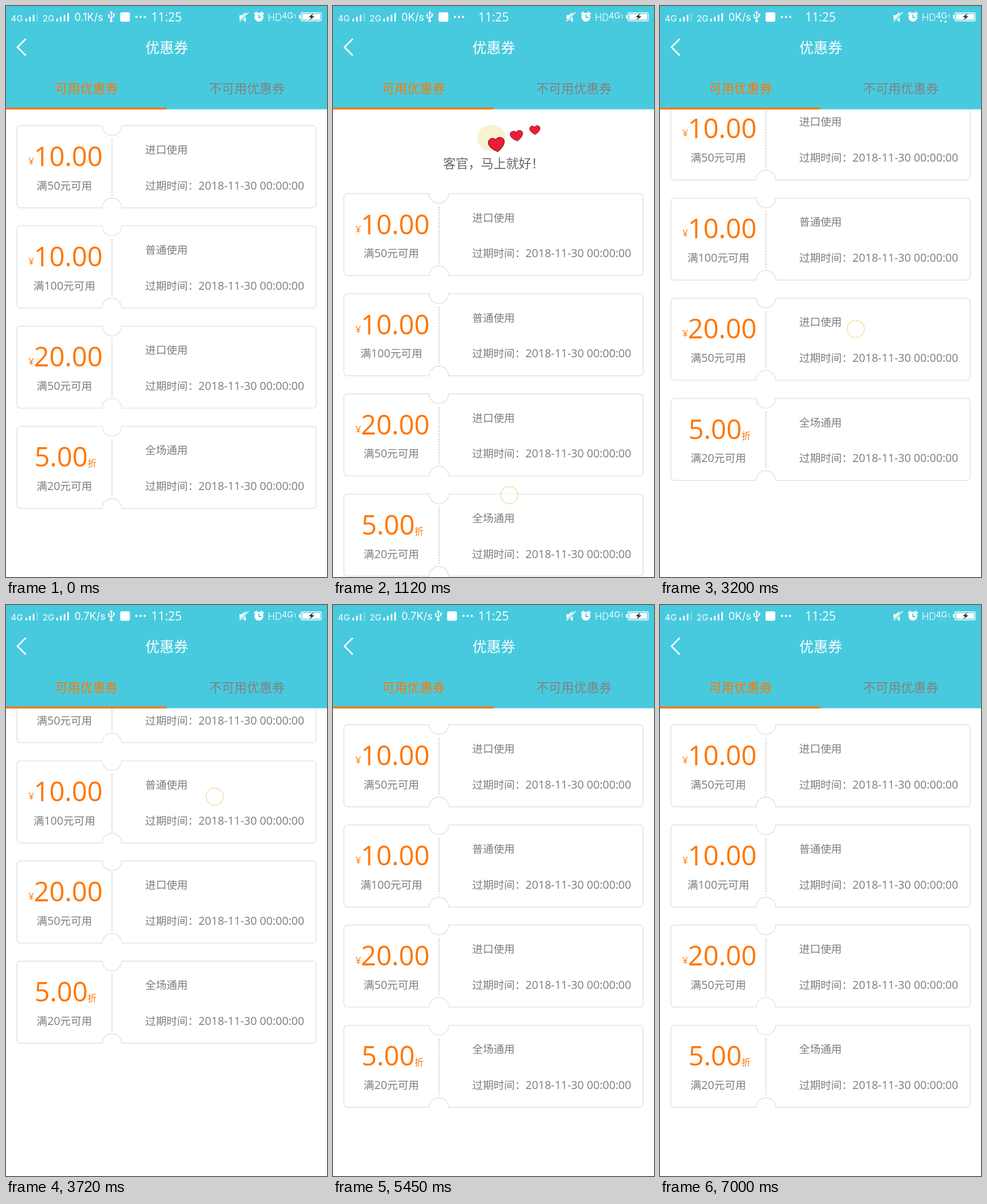
An HTML page that plays this animation: 561x998 px, repeating every 7080 ms.

```html
<!DOCTYPE html>
<html lang="zh-CN">
<head>
<meta charset="utf-8">
<style>
html, body { margin: 0; width: 100%; height: 100%; overflow: hidden; background: #fff; }
svg { display: block; width: 561px; height: 998px; font: 300 18.6px Inter, "Noto Sans CJK SC", "Noto Sans CJK", sans-serif; }
.mid { text-anchor: middle; }
.tab { font-size: 22px; }
.num { font-family: "Open Sans", sans-serif; font-size: 19.6px; font-weight: 400; }
.price { font: 400 47px "Open Sans", "Noto Sans CJK SC", "Noto Sans CJK", sans-serif; fill: #ff7600; }
.price .yuan { font-size: 17px; }
.price .off { font-size: 15.5px; font-weight: 300; }
.heart { fill: #ee1c35; stroke: #8a1020; stroke-width: .08; }
</style>
</head>
<body>
<svg viewBox="0 0 561 998">
  <defs>
    <path id="heart" class="heart" d="M0 .9C-1.3 0-.9-.9-.4-.9-.15-.9 0-.7 0-.5 0-.7.15-.9.4-.9 .9-.9 1.3 0 0 .9z"/>
    <g id="frame" fill="none">
      <path stroke="#e1e1e1" stroke-width="1.4" d="M25 209.3H168A17 17 0 0 0 202 209.3H536a6 6 0 0 1 6 6V346.7a6 6 0 0 1-6 6H202A17 17 0 0 0 168 352.7H25a6 6 0 0 1-6-6V215.3a6 6 0 0 1 6-6z"/>
      <path stroke="#c8c8c8" stroke-width="1.4" stroke-dasharray="3 1.6" d="M185.3 232V331"/>
    </g>
  </defs>

  <g id="page">
    <g id="refresh">
      <ellipse cx="277" cy="112.5" rx="25" ry="23" fill="#f9f1cf"/>
      <use href="#heart" transform="translate(286 124) rotate(-8) scale(16 13.5)"/>
      <use href="#heart" class="fly" transform="translate(321 108.5) rotate(-8) scale(12.5 10)"/>
      <use href="#heart" class="fly" transform="translate(353 98.5) rotate(-5) scale(10.5 8.5)"/>
      <text id="hint" class="mid" x="280.5" y="164.5" font-size="22" fill="#666"></text>
    </g>
    <g id="list" fill="#7d7d7d"></g>
  </g>

  <rect width="561" height="180.5" fill="#48cade"/>
  <g id="status" fill="#fff" font-weight="400">
    <text x="8.5" y="27" font-size="15">4G</text>
    <text x="64" y="27" font-size="15">2G</text>
    <g id="bars"></g>
    <text id="speed" x="119.5" y="26" font-size="18.2"></text>
    <g id="icons">
      <path d="M183.5 12V25M179 16v3.5l4.5 3M188 15v3l-4.5 3" fill="none" stroke="#fff" stroke-width="1.6"/>
      <path d="M180.5 13l3-4.500 3 4.500z"/>
      <circle cx="183.5" cy="26" r="2.4"/><circle cx="179" cy="16" r="1.7"/>
      <rect x="186.3" y="13.5" width="3.4" height="3.4"/>
      <rect x="199" y="11" width="17" height="16.5" rx="3"/>
      <circle cx="227.5" cy="19" r="2"/><circle cx="234.8" cy="19" r="2"/><circle cx="242" cy="19" r="2"/>
    </g>
    <text class="mid num" x="280.5" y="27" style="font-size:21px">11:25</text>
    <path d="M408 16h4l7-5v17l-7-5h-4z"/>
    <path d="M408 28L423 12" stroke="#48cade" stroke-width="4"/>
    <path d="M408 27L424 11" stroke="#fff" stroke-width="1.6"/>
    <circle cx="442" cy="19.5" r="7.8"/>
    <path d="M433.5 14.5l5-4M450.5 14.5l-5-4" stroke="#fff" stroke-width="2.4"/>
    <path d="M442 14.5V20h4.5" fill="none" stroke="#48cade" stroke-width="1.8"/>
    <text x="457.5" y="26" font-size="17" font-weight="300">HD</text>
    <text x="482" y="21.5" font-size="14.5">4G</text>
    <text x="503" y="21.5" font-size="9">1</text>
    <path id="arrows" d="M488.5 24.5h5.5l-2.75 4zM496 28.5h5.5l-2.75-4z"/>
    <rect x="515.5" y="12" width="35.5" height="14" rx="2" fill="none" stroke="#fff" stroke-width="1.3"/>
    <rect x="517.5" y="14" width="31.5" height="10"/>
    <rect x="512" y="16" width="2.5" height="6"/>
    <path fill="#222" d="M537 13l-8 6.5h4.5l-2.5 5 8-6.500h-4.500z"/>
  </g>
  <path d="M34.5 57.5L20 72l14.500 14.500" fill="none" stroke="#fff" stroke-width="2.6"/>
  <text class="mid" x="281" y="81.5" font-size="25" fill="#fff">优惠券</text>
  <text id="tabA" class="mid tab" x="140.7" y="152">可用优惠券</text>
  <text id="tabB" class="mid tab" x="421" y="152">不可用优惠券</text>
  <rect id="line" y="177.5" width="280.5" height="3.3" fill="#ff7600"/>

  <circle id="finger" r="15" fill="#fff" fill-opacity=".5" stroke="#f8e4ba" stroke-width="2"/>
</svg>
<script>
const $ = id => document.getElementById(id);
const LOOP = 7080;
const ORANGE = '#ff7600', GREY = '#808080';

const coupons = [
  ['10.00', 50, '进口使用'],
  ['10.00', 100, '普通使用'],
  ['20.00', 50, '进口使用'],
  ['5.00', 20, '全场通用', true]
];
$('list').innerHTML = coupons.map(([value, minimum, scope, discount], i) => {
  const price = discount
    ? `${value}<tspan class="off">折</tspan>`
    : `<tspan class="yuan" dy="-3">¥</tspan><tspan dy="3">${value}</tspan>`;
  return `<g transform="translate(0 ${i * 175.1})"><use href="#frame"/>
    <text class="mid price" x="104" y="280">${price}</text>
    <text class="mid" x="102" y="320.7">满<tspan class="num">${minimum}</tspan>元可用</text>
    <text x="243.3" y="258">${scope}</text>
    <text x="243.3" y="320.7">过期时间：<tspan class="num">2018-11-30 00:00:00</tspan></text></g>`;
}).join('');

$('bars').innerHTML = [34, 88].map(x => [0, 1, 2, 3].map(i => {
  const h = 5 + i * 3.2;
  const dim = x < 50 && i > 2 ? .25 : 1;
  return `<rect x="${x + i * 6.4}" y="${27 - h}" width="2.8" height="${h}" opacity="${dim}"/>`;
}).join('')).join('');

// Piecewise linear value through [time, value] points
function track(t, points) {
  let [t0, v0] = points[0];
  if (t <= t0) return v0;
  for (const [t1, v1] of points) {
    if (t < t1) return v0 + (v1 - v0) * (t - t0) / (t1 - t0);
    [t0, v0] = [t1, v1];
  }
  return v0;
}

const scroll = [[150, 0], [400, 48], [780, 100], [1120, 118.5], [1220, 120], [1400, 112.4],
  [2160, 112.4], [2250, 40], [2330, 8], [2420, 0], [2990, 0], [3200, -48.6], [3450, -86], [3720, -112],
  [4100, -132], [4410, -142], [4580, -142], [4680, -85], [4780, -40], [4900, -10], [5050, 0]];
const swipe = [[5700, 0], [5800, .35], [5920, .85], [6050, 1], [6400, 1], [6500, .65], [6620, .15], [6760, 0]];
const drags = [
  { from: 120, to: 1220, x: [[120, 300], [1120, 308]], y: [[120, 430], [780, 730], [1120, 855]] },
  { from: 2960, to: 4580, x: [[2960, 325], [3200, 342], [4410, 395]],
    y: [[2960, 700], [3200, 565], [3720, 335], [4410, 195]] }
];

function draw(t) {
  const s = track(t, scroll), p = track(t, swipe);
  $('page').setAttribute('transform', `translate(${-561 * p} 0)`);
  $('list').setAttribute('transform', `translate(0 ${s})`);
  $('refresh').setAttribute('transform', `translate(0 ${s})`);
  $('refresh').style.display = s > 0 ? '' : 'none';

  const done = t >= 1900;
  $('hint').textContent = done ? '刷新完成' : '客官，马上就好！';
  const flying = done ? 0 : Math.floor(t / 200) % 3;
  document.querySelectorAll('.fly').forEach((h, i) => h.style.display = i < flying ? '' : 'none');

  $('line').setAttribute('x', 280.5 * p);
  $('tabA').setAttribute('fill', p < .5 ? ORANGE : GREY);
  $('tabB').setAttribute('fill', p < .5 ? GREY : ORANGE);

  const rate = t < 430 ? '0.1' : t < 3450 ? '0' : t < 6400 ? '0.7' : '0';
  $('speed').textContent = rate + 'K/s';
  $('icons').setAttribute('transform', `translate(${rate === '0' ? -14.5 : 0.5} 0)`);
  $('arrows').setAttribute('opacity', t >= 2000 && t < 3450 ? .9 : .15);

  const drag = drags.find(d => t >= d.from && t < d.to);
  $('finger').style.display = drag ? '' : 'none';
  if (drag) $('finger').setAttribute('transform', `translate(${track(t, drag.x)} ${track(t, drag.y)})`);
}

const start = performance.now();
function tick() {
  draw((performance.now() - start) % LOOP);
  requestAnimationFrame(tick);
}
tick();
</script>
</body>
</html>
```
